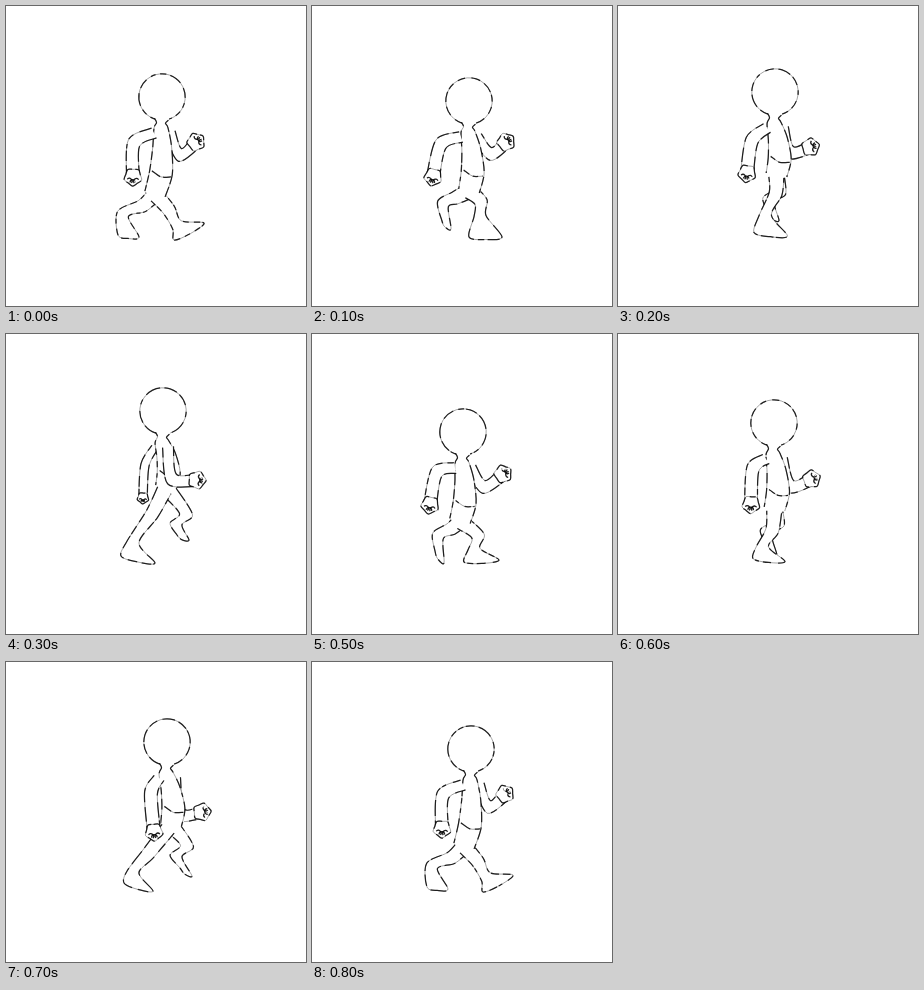
These frames come from a looping animation (300x300 px, 900 ms). An HTML page with a canvas:

```html
<!DOCTYPE html>
<html lang="en">
<head>
<meta charset="utf-8">
<title>Walk cycle</title>
<style>
html, body { margin: 0; width: 100%; height: 100%; overflow: hidden; background: #fff; }
canvas { display: block; width: 300px; height: 300px; }
</style>
</head>
<body>
<canvas id="stage" width="300" height="300"></canvas>
<script>
const ctx = document.getElementById('stage').getContext('2d');
const STEP = 100, LOOP = 900, HEAD_R = 23.2;

// Key joints. Arms: elbow, hand. Legs: knee, ankle, heel, toe.
const contact = {
  head: [156, 91], hip: [149, 188],
  back: [[128, 137], [127, 171]], fore: [[174, 149], [190, 136]],
  stand: [[163, 204], [171, 219], [168, 234], [198, 217]],
  swing: [[136, 200], [117, 208], [112, 229], [133, 231]]
};
const dipA = {
  head: [157, 95], hip: [157, 185],
  back: [[129, 138], [121, 171]], fore: [[179, 148], [194, 136]],
  stand: [[169, 196], [168, 210], [157, 231], [190, 231]],
  swing: [[143, 192], [131, 198], [130, 215], [139, 223]]
};
const highA = {
  head: [157, 77], hip: [160, 153], foreNear: true,
  back: [[139, 131], [137, 164]], fore: [[166, 145], [191, 146]],
  stand: [[146, 180], [127, 208], [115, 222], [149, 229]],
  swing: [[180, 180], [170, 190], [171, 201], [183, 206]]
};
const dipB = {
  head: [151, 98], hip: [148, 187],
  back: [[125, 138], [118, 171]], fore: [[172, 153], [191, 140]],
  stand: [[166, 202], [162, 215], [152, 228], [187, 226]],
  swing: [[139, 195], [126, 202], [123, 217], [132, 229]]
};
const highB = {
  head: [161, 80], hip: [165, 163],
  back: [[145, 131], [148, 170]], fore: [[174, 152], [196, 150]],
  stand: [[142, 192], [127, 210], [118, 221], [147, 229]],
  swing: [[181, 184], [170, 194], [174, 206], [186, 214]]
};

const lerp = (a, b, t) => a.map((v, i) => v + (b[i] - v) * t);
const add = (p, x, y) => [p[0] + x, p[1] + y];
const unit = ([x, y]) => { const d = Math.hypot(x, y) || 1; return [x / d, y / d]; };
const toward = (a, b) => unit([b[0] - a[0], b[1] - a[1]]);
const noise = n => { const v = Math.sin(n * 12.9898) * 43758.5453; return v - Math.floor(v); };

// Applies a function to every joint of a pose.
function mapPose(pose, fn) {
  const out = {};
  for (const [key, v] of Object.entries(pose)) {
    out[key] = !Array.isArray(v) ? v
      : Array.isArray(v[0]) ? v.map((p, i) => fn(p, key, i)) : fn(v, key);
  }
  return out;
}
const shift = (pose, x, y) => mapPose(pose, p => add(p, x, y));
const between = (a, b) => mapPose(a, (p, key, i) => lerp(p, i === undefined ? b[key] : b[key][i], 0.5));

const cycle = [
  contact, dipA, between(dipA, highA), highA, shift(contact, 1, -4),
  dipB, between(dipB, highB), highB, shift(contact, 3, -4)
];

// Smooth curve through all points.
function curve(pts, closed) {
  const path = new Path2D(), n = pts.length, k = 0.15;
  const at = i => closed ? pts[(i + n) % n] : pts[Math.min(n - 1, Math.max(0, i))];
  path.moveTo(...pts[0]);
  for (let i = 0; i < (closed ? n : n - 1); i++) {
    const [a, b, c, d] = [at(i - 1), at(i), at(i + 1), at(i + 2)];
    path.bezierCurveTo(b[0] + (c[0] - a[0]) * k, b[1] + (c[1] - a[1]) * k,
      c[0] - (d[0] - b[0]) * k, c[1] - (d[1] - b[1]) * k, ...c);
  }
  return path;
}

// The two outlines of a bent tube; joints past the widths only steer the end.
function sides(joints, widths) {
  const left = [], right = [];
  widths.forEach((w, i) => {
    const p = joints[i], prev = joints[i - 1] || p, next = joints[i + 1] || p;
    const a = toward(prev, p), b = toward(p, next);
    const [dx, dy] = unit([a[0] + b[0], a[1] + b[1]]);
    left.push(add(p, -dy * w, dx * w));
    right.push(add(p, dy * w, -dx * w));
  });
  return [left, right];
}

let seed = 0;

// Pale thin line with uneven, heavier pen pressure on top.
function ink(path) {
  seed++;
  ctx.setLineDash([]);
  ctx.strokeStyle = 'rgba(0,0,0,0.4)';
  ctx.lineWidth = 0.9;
  ctx.stroke(path);
  ctx.setLineDash(Array.from({ length: 8 }, (_, i) => (i % 2 ? 2 : 4) + noise(seed * 9 + i) * (i % 2 ? 5 : 12)));
  ctx.strokeStyle = 'rgba(0,0,0,0.82)';
  ctx.lineWidth = 1.25;
  ctx.stroke(path);
}

function tube(joints, widths) {
  const [left, right] = sides(joints, widths);
  ctx.fill(curve([...left, ...right.slice().reverse()]));
  ink(curve(left));
  ink(curve(right));
}

function hand([x, y], angle, r) {
  const polar = (a, d) => [x + Math.cos(a) * d, y + Math.sin(a) * d];
  const rim = Array.from({ length: 10 }, (_, k) => polar(angle + k * Math.PI / 5, r * (k % 2 ? 0.9 : 1.08)));
  const path = curve(rim, true);
  ctx.fill(path);
  ink(path);
  for (let k = -1; k <= 1; k++) {
    const a = angle + k * 0.7, [fx, fy] = polar(a, r * 0.65), finger = new Path2D();
    finger.arc(fx, fy, r * 0.33, a + 1.6, a + 4.7);
    ink(finger);
  }
}

function arm(shoulder, [elbow, palm], scale) {
  tube([shoulder, elbow, palm], [5.5, 6.5, 6.5].map(w => w * scale));
  hand(palm, Math.atan2(palm[1] - elbow[1], palm[0] - elbow[0]), 8.5 * scale);
}

function leg(hip, [knee, ankle, heel, toe]) {
  const sole = lerp(heel, toe, 0.5), [ux, uy] = toward(heel, toe);
  const [left, right] = sides([lerp(hip, knee, 0.12), knee, ankle, sole], [7.5, 6.5, 6]);
  const path = curve([...left, heel, add(sole, -uy * 2.5, ux * 2.5), toe, ...right.reverse()]);
  ctx.fill(path);
  ink(path);
}

function torso(head, neck, hip) {
  const chest = add(lerp(neck, hip, 0.3), 3, 0), belly = add(lerp(neck, hip, 0.68), 4, 0);
  tube([add(head, -0.5, HEAD_R - 1), add(neck, 0, -5), neck, chest, belly, hip], [7, 4.5, 7, 9.5, 11.5, 10.5]);
  ink(curve([add(belly, -9, -2), add(belly, 0, 4), add(belly, 10, 4)]));
}

function draw(index) {
  const { head, hip, back, fore, stand, swing, foreNear } = cycle[index];
  const neck = add(head, -1, 31);
  const backArm = () => arm(add(neck, -7, 5), back, foreNear ? 0.65 : 1);
  const foreArm = () => arm(add(neck, foreNear ? 6 : 9, 5), fore, 1);
  seed = index * 20;
  ctx.fillStyle = '#fff';
  ctx.fillRect(0, 0, 300, 300);
  ctx.lineCap = 'butt';
  ctx.lineJoin = 'round';
  (foreNear ? backArm : foreArm)();
  leg(hip, swing);
  leg(hip, stand);
  torso(head, neck, hip);
  (foreNear ? foreArm : backArm)();
  const skull = new Path2D();
  skull.arc(...head, HEAD_R, Math.PI * 0.6, Math.PI * 2.4);
  ink(skull);
}

function tick() {
  draw(Math.floor(performance.now() % LOOP / STEP));
  requestAnimationFrame(tick);
}
tick();
</script>
</body>
</html>
```
